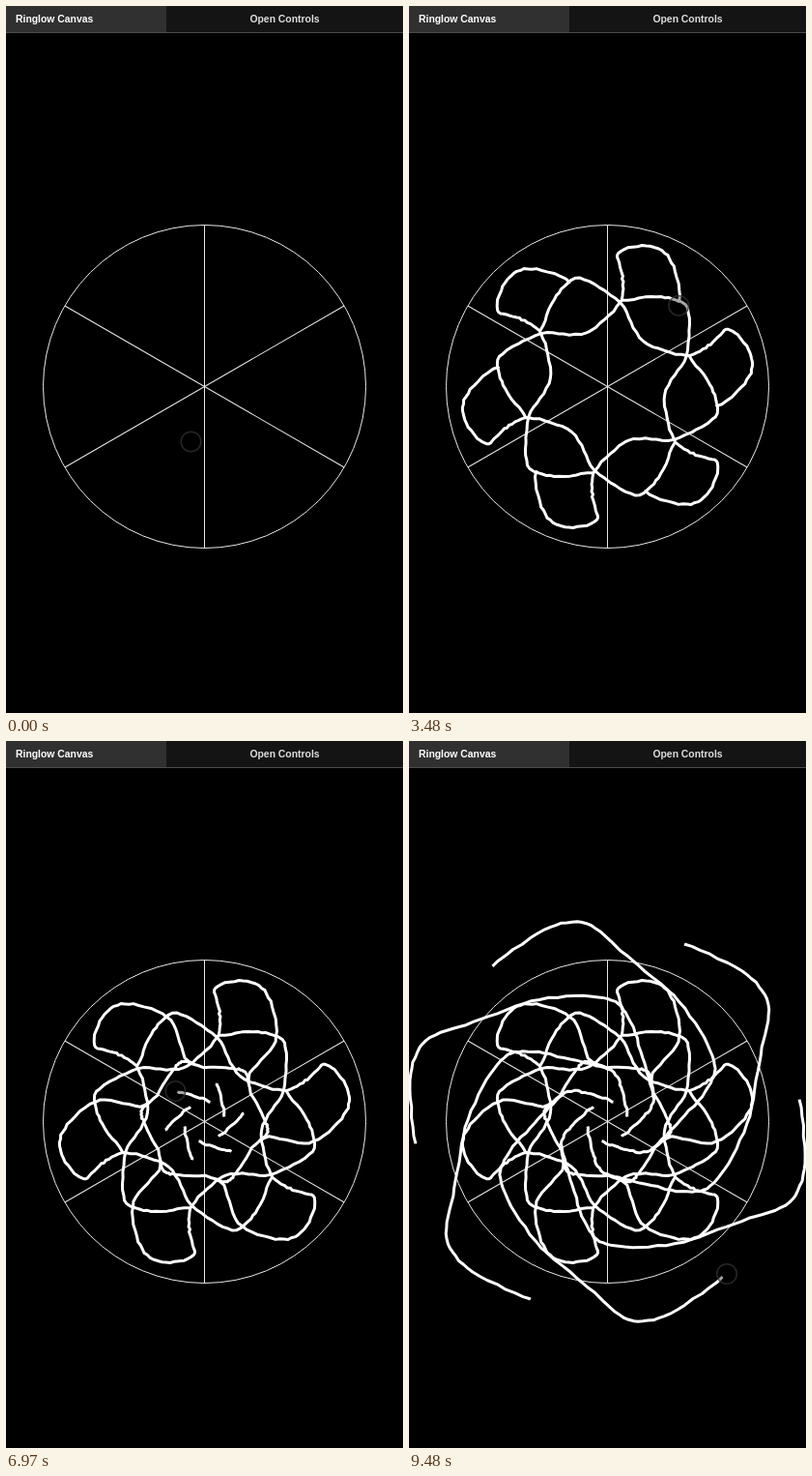
An HTML page that plays this animation: 411x731 px, repeating every 9580 ms.

```html
<!DOCTYPE html>
<html lang="en">
<head>
<meta charset="utf-8">
<title>Ringlow Canvas</title>
<style>
  html, body { margin: 0; width: 100%; height: 100%; overflow: hidden; background: #000; }
  svg { display: block; width: 100%; height: 100%; }
  text { font: bold 10.4px Arial, "Liberation Sans", sans-serif; }
</style>
</head>
<body>
<svg viewBox="0 0 411 731">
  <defs>
    <path id="ink" fill="none" stroke="#fff" stroke-width="3" stroke-linejoin="round"/>
  </defs>
  <rect width="411" height="731"/>
  <g fill="none" stroke="#e8e8e8">
    <circle cx="205.5" cy="393.5" r="167"/>
    <g id="spokes"></g>
  </g>
  <g id="copies"></g>
  <circle id="cursor" r="10.3" fill="#000" fill-opacity=".35" stroke="#333" stroke-opacity=".75" stroke-width="1.6"/>
  <rect width="411" height="27" fill="#141414"/>
  <rect width="166" height="27" fill="#303030"/>
  <rect y="27" width="411" height="1" fill="#4c4c4c"/>
  <text x="10" y="17" fill="#fff">Ringlow Canvas</text>
  <text x="288.5" y="17" fill="#ddd" text-anchor="middle">Open Controls</text>
</svg>
<script>
const LOOP = 9580, STEP = 50, LAG = 30, SUB = 8;
const CX = 205.5, CY = 393.5;
const $ = id => document.getElementById(id);

// Pointer moves: a spline through a few points; keys pair a time with a position along it.
const moves = [
  {
    pts: [[191.5,450.5], [135,422], [132,431]],
    keys: [[520,0], [760,1], [1070,1], [1220,2]]
  },
  {
    draws: true,
    pts: [[122,426], [98,392], [94,363], [137,339], [183,338], [218,307], [221,279], [217,255],
      [249,248], [272,265], [279,311], [251,348], [266,388], [271,402], [264,413]],
    keys: [[1430,0], [1640,2], [2470,6.1], [3400,9.8], [4180,11.7], [4360,11.7], [4800,14]]
  },
  {
    pts: [[264,413], [311,454], [228,402], [221,380]],
    keys: [[5420,0], [6180,3]]
  },
  {
    draws: true,
    pts: [[212,373], [185,364], [162,364], [134,391], [101,429], [97,462], [131,517],
      [186,565], [227,598], [271,592], [329,551]],
    keys: [[6550,0], [7770,4.1], [8490,6.1], [9470,10]]
  }
];
const strokes = moves.filter(m => m.draws);

function along(keys, t) {
  if (t <= keys[0][0]) return keys[0][1];
  for (let i = 1; i < keys.length; i++) {
    const [t0, a] = keys[i - 1], [t1, b] = keys[i];
    if (t < t1) return a + (b - a) * (t - t0) / (t1 - t0);
  }
  return keys[keys.length - 1][1];
}

// Catmull-Rom position at u.
function point(pts, u) {
  const last = pts.length - 1, i = Math.min(Math.floor(u), last - 1), f = u - i;
  const p = k => pts[Math.max(0, Math.min(last, i + k))];
  return [0, 1].map(c => {
    const a = p(-1)[c], b = p(0)[c], d = p(1)[c], e = p(2)[c];
    return b + .5 * f * (d - a + f * (2 * a - 5 * b + 4 * d - e + f * (3 * (b - d) + e - a)));
  });
}

// Unsteady hand.
const noise = n => {
  const v = Math.sin(n * 127.1 + 3.7) * 43758.5453;
  return (v - Math.floor(v) - .5) * 1.4;
};

function trace({ pts, keys }, t) {
  const end = along(keys, t);
  if (end <= 0) return "";
  const line = [];
  for (let k = 0; k / SUB < end; k++) {
    const [x, y] = point(pts, k / SUB);
    line.push([x + noise(k), y + noise(k + 500)]);
  }
  line.push(point(pts, end));
  return "M" + line.map(p => p.map(v => v.toFixed(2)).join(" ")).join("L");
}

function pointer(t) {
  const { pts, keys } = moves.filter(m => t >= m.keys[0][0]).pop() || moves[0];
  return point(pts, along(keys, t));
}

function draw(time) {
  const t = Math.max(0, Math.floor((time - 20) / STEP) * STEP + 20);
  $("ink").setAttribute("d", strokes.map(s => trace(s, t - LAG)).join(""));
  const [x, y] = pointer(t);
  $("cursor").setAttribute("cx", x);
  $("cursor").setAttribute("cy", y);
}

const turned = (n, make) => Array.from({ length: n }, (_, i) => make(`rotate(${i * 60} ${CX} ${CY})`)).join("");
$("spokes").innerHTML = turned(3, r => `<path d="M${CX} 226.5V560.5" transform="${r}"/>`);
$("copies").innerHTML = turned(6, r => `<use href="#ink" transform="${r}"/>`);

const start = performance.now();
function tick() {
  draw((performance.now() - start) % LOOP);
  requestAnimationFrame(tick);
}
tick();
</script>
</body>
</html>
```
